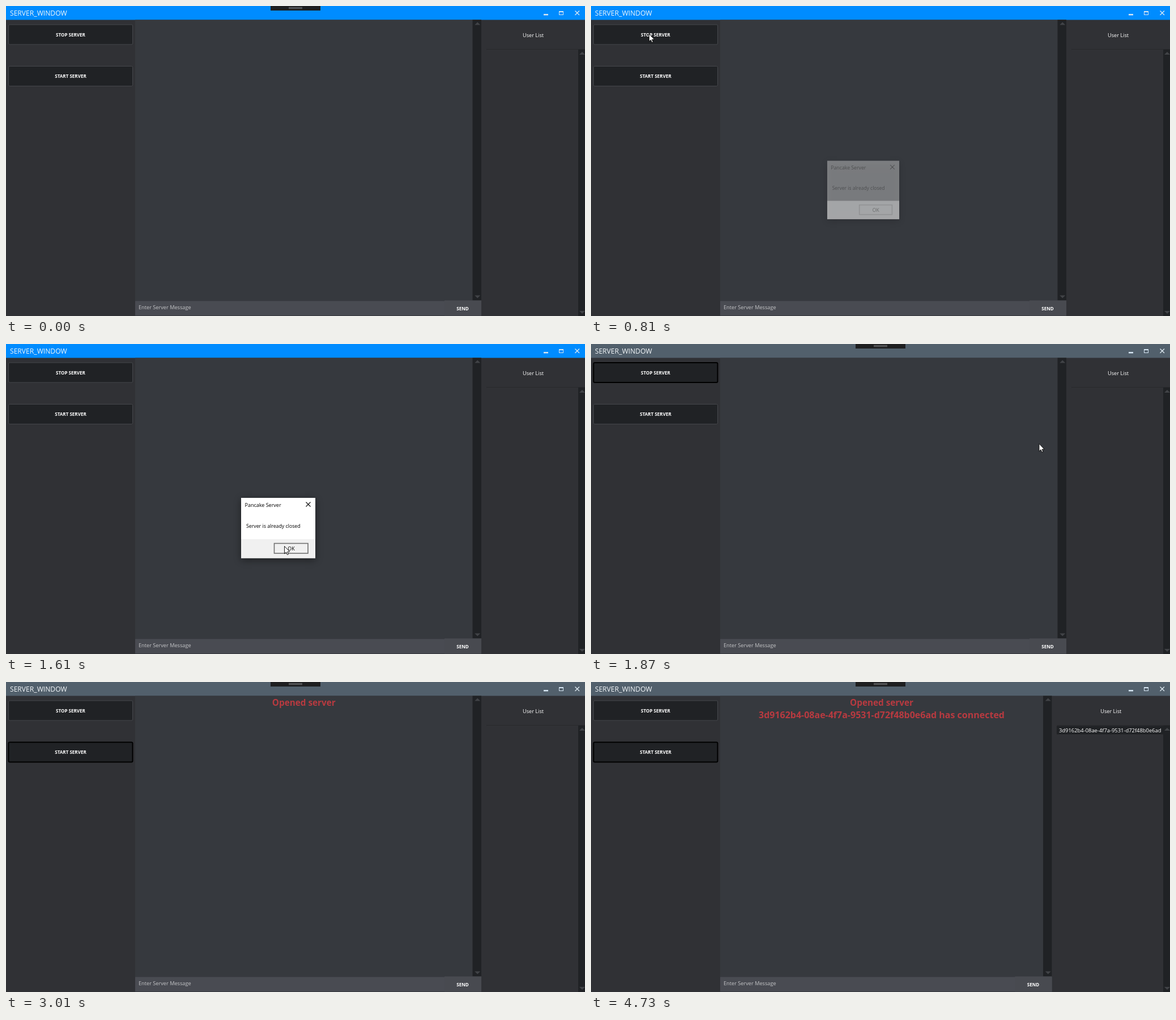
Write an HTML page with a canvas that moves like this. It is 1022 by 548 pixels and loops after 8 s.

```html
<!DOCTYPE html>
<html lang="en">
<head>
<meta charset="utf-8">
<title>Server window</title>
<style>
html, body { margin: 0; width: 100%; height: 100%; overflow: hidden; background: #303135; }
canvas { display: block; }
</style>
</head>
<body>
<canvas id="stage" width="1022" height="548"></canvas>
<script>
const ctx = document.getElementById('stage').getContext('2d');
const LOOP = 8000;
const GUID = '3d9162b4-08ae-4f7a-9531-d72f48b0e6ad';
const DARK = '#202225', PANEL = '#303135';

// Pointer routes: [time, x, y]; the pointer is hidden outside them.
const routes = [
  [[220, 763, 531], [440, 102, 49], [900, 102, 49], [1430, 491, 357], [1690, 491, 357],
   [1870, 792, 176], [2270, 170, 118], [2520, 170, 118], [2640, 303, 187], [3010, 1012, 456]],
  [[4180, 1002, 274], [4250, 934, 260], [4400, 934, 260], [4550, 1010, 282]]
];

const ramp = (t, a, b) => Math.min(1, Math.max(0, (t - a) / (b - a)));
const pulse = (t, a, b, c, d) => ramp(t, a, b) - ramp(t, c, d);

function rect(x, y, w, h, color) {
  ctx.fillStyle = color;
  ctx.fillRect(x, y, w, h);
}

function text(str, x, y, size, color, align = 'left', weight = 400) {
  ctx.font = `${weight} ${size}px "Open Sans", "Noto Sans", sans-serif`;
  ctx.textAlign = align;
  ctx.fillStyle = color;
  ctx.fillText(str, x, y);
}

function path(points, close) {
  ctx.beginPath();
  points.forEach(([x, y]) => ctx.lineTo(x, y));
  if (close) ctx.closePath();
}

function cross(x, y, size, color, width) {
  ctx.strokeStyle = color;
  ctx.lineWidth = width;
  path([[x, y], [x + size, y + size]]);
  ctx.stroke();
  path([[x + size, y], [x, y + size]]);
  ctx.stroke();
}

function scrollbar(x, y, w, h) {
  rect(x, y, w, h, DARK);
  const cx = x + w / 2 + 1;
  ctx.fillStyle = '#414347';
  for (const [base, tip] of [[y + 9, y + 4], [y + h - 9, y + h - 4]]) {
    path([[cx - 5, base], [cx + 5, base], [cx, tip]], true);
    ctx.fill();
  }
}

function button(label, y, hover, focused) {
  ctx.beginPath();
  ctx.roundRect(4.5, y + 0.5, 219, 35, 2);
  ctx.fillStyle = DARK;
  ctx.fill();
  ctx.fillStyle = `rgba(232,232,232,${hover})`;
  ctx.fill();
  ctx.strokeStyle = focused ? '#000' : '#45474b';
  ctx.lineWidth = focused ? 2 : 1;
  ctx.stroke();
  text(label, 114, y + 21, 8.05, '#fff', 'center', 700);
}

function titleBar(active, toolbar) {
  rect(0, 0, 1022, 24.5, active ? '#008cff' : '#52606c');
  text('SERVER_WINDOW', 7, 17, 12.1, '#f4f7fa');
  rect(949, 14, 8, 2.5, '#d5e5f2');
  ctx.strokeStyle = '#d5e5f2';
  ctx.lineWidth = 1;
  ctx.strokeRect(976.5, 9.5, 7, 6);
  rect(976, 9, 8, 2, '#d5e5f2');
  cross(1004.5, 8.5, 7.5, '#e0ebf4', 1.3);
  if (toolbar) {
    rect(467, 0, 88, 8, '#1e1f20');
    rect(499, 2, 24, 1, '#77787a');
    rect(499, 4, 24, 1, '#77787a');
  }
}

function chat(right, opened, connected) {
  const mid = (228 + right - 15.5) / 2;
  rect(228, 24.5, right - 228, 523.5, '#36393e');
  scrollbar(right - 15.5, 24.5, 15.5, 496);
  rect(228, 521.5, right - 228, 25.5, '#494b52');
  rect(right - 65, 520.5, 65, 27, '#484a50');
  text('Enter Server Message', 234, 536, 9.2, '#c5c6c8');
  text('SEND', right - 33, 538, 8.1, '#fff', 'center', 700);
  if (opened) text('Opened server', mid, 42, 15.3, '#b83a40', 'center', 700);
  if (connected) text(GUID + ' has connected', mid, 63.5, 16, '#b83a40', 'center', 700);
}

function userList(right, connected) {
  text('User List', (right + 1022) / 2, 54.5, 9.2, '#fff', 'center');
  rect(right + 9, 76, 1013 - right, 1, '#28292c');
  scrollbar(1010, 77, 12, 471);
  if (connected) {
    rect(822, 77.5, 188, 15, DARK);
    text(GUID, 826, 88.5, 9.4, '#fff');
  }
}

function dialog(shown) {
  if (shown <= 0) return;
  const scale = 0.954 + 0.046 * shown;
  ctx.save();
  ctx.globalAlpha = shown;
  ctx.translate(480.5, 325);
  ctx.scale(scale, scale);
  ctx.translate(-480.5, -325);
  ctx.shadowColor = 'rgba(0,0,0,.45)';
  ctx.shadowBlur = 12;
  ctx.shadowOffsetY = 3;
  rect(415, 272, 131, 106.5, '#fff');
  ctx.shadowColor = 'transparent';
  rect(415, 345, 131, 33.5, '#f0f0f0');
  text('Pancake Server', 421.5, 287.5, 9, '#000');
  cross(529.5, 279.5, 8, '#111', 1.1);
  text('Server is already closed', 424, 324.5, 8.78, '#000');
  ctx.strokeStyle = '#707070';
  ctx.lineWidth = 1.6;
  ctx.strokeRect(473.5, 352.5, 59.5, 17.5);
  text('OK', 503.5, 364.8, 8.8, '#000', 'center');
  ctx.restore();
}

function pointer(t) {
  const route = routes.find(r => t >= r[0][0] && t < r[r.length - 1][0]);
  if (!route) return;
  const i = route.findIndex(p => p[0] > t);
  const [t0, x0, y0] = route[i - 1], [t1, x1, y1] = route[i];
  const k = ramp(t, t0, t1);
  ctx.save();
  ctx.translate(x0 + (x1 - x0) * k + 0.5, y0 + (y1 - y0) * k + 0.5);
  path([[0, 0], [0, 13.2], [3, 10.5], [5, 15], [7.1, 14.1], [5.2, 9.8], [9.2, 9.6]], true);
  ctx.fillStyle = '#fff';
  ctx.fill();
  ctx.strokeStyle = '#000';
  ctx.lineWidth = 0.9;
  ctx.stroke();
  ctx.restore();
}

function draw() {
  const t = performance.now() % LOOP;
  const connected = t >= 4730, right = connected ? 813.5 : 839;
  const closed = t >= 1700, opened = t >= 2390;
  rect(0, 0, 1022, 548, PANEL);
  titleBar(!closed, t < 740 || closed);
  button('STOP SERVER', 32.5, pulse(t, 340, 440, 660, 770), closed && t < 2350);
  button('START SERVER', 106, pulse(t, 2180, 2270, 2630, 2830), t >= 2350);
  chat(right, opened, connected);
  userList(right, connected);
  dialog(pulse(t, 740, 940, 1690, 1790));
  pointer(t);
  requestAnimationFrame(draw);
}
draw();
</script>
</body>
</html>
```
